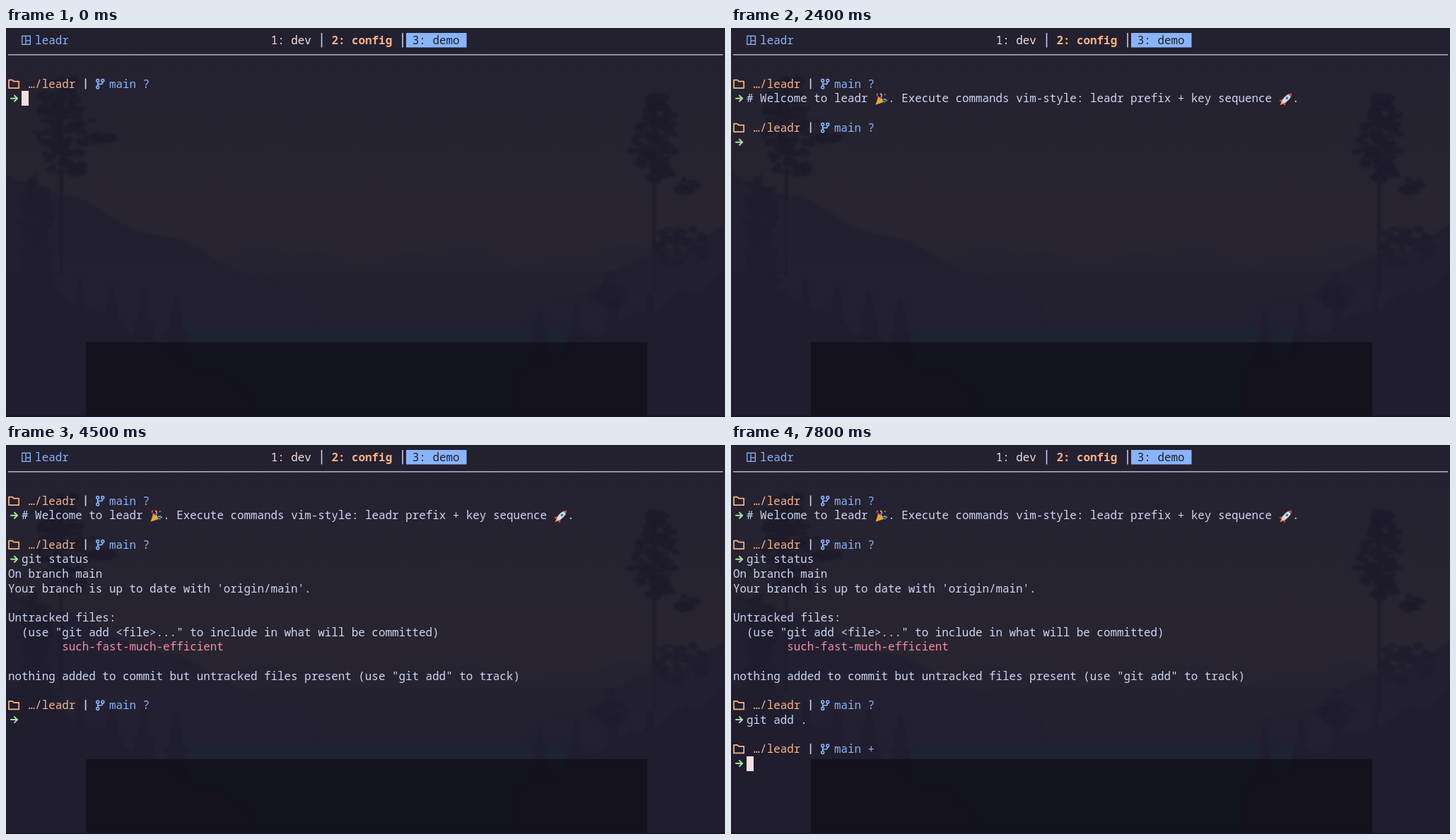
An HTML page with a canvas for the animation above (8000 ms loop, 1017 by 551 pixels).

```html
<!DOCTYPE html>
<html lang="en">
<head>
<meta charset="utf-8">
<title>leadr demo</title>
<style>
  html, body { margin: 0; width: 100%; height: 100%; overflow: hidden; background: #211f2f; }
  canvas { display: block; width: 1017px; height: 551px; }
</style>
</head>
<body>
<canvas id="stage" width="1017" height="551"></canvas>
<script>
const W = 1017, H = 551, LOOP = 8000;
const CELL = 9.53, ROW = 20.67, LEFT = 3, TOP = 6.7;
const MONO = '"Noto Sans Mono", "DejaVu Sans Mono", monospace';
const FONT = '15.88px ' + MONO;
const KEY_FONT = '62.5px ' + MONO;
const C = {
  text: '#cdd6f4', blue: '#89b4fa', peach: '#fab387', green: '#a6e3a1',
  red: '#f38ba8', cursor: '#f5e0dc', dark: '#1e1e2e'
};
const ctx = document.getElementById('stage').getContext('2d');
const colX = c => LEFT + c * CELL;
const rowY = r => TOP + r * ROW;
const midY = r => rowY(r) + ROW / 2;

// ---------- backdrop ----------
function seeded(seed) {
  return () => (seed = (seed * 16807) % 2147483647) / 2147483647;
}

function makeBackdrop() {
  const cv = document.createElement('canvas');
  cv.width = W; cv.height = H;
  const g = cv.getContext('2d'), rnd = seeded(77);

  const fade = (y0, y1, ...colors) => {
    const gr = g.createLinearGradient(0, y0, 0, y1);
    colors.forEach((c, i) => gr.addColorStop(i / (colors.length - 1), c));
    return gr;
  };
  const ridge = (fill, x0, x1, height) => {
    g.fillStyle = fill;
    g.beginPath();
    g.moveTo(x0, H);
    for (let x = x0; x <= x1; x += 4) g.lineTo(x, height(x));
    g.lineTo(x1, H);
    g.fill();
  };
  const leaves = (x, y, rx, ry, n) => {
    for (let i = 0; i < n; i++) {
      const a = rnd() * 6.283, d = Math.sqrt(rnd());
      g.beginPath();
      g.ellipse(x + Math.cos(a) * d * rx, y + Math.sin(a) * d * ry, 3 + rnd() * 5, 2 + rnd() * 3, 0, 0, 7);
      g.fill();
    }
  };
  const pine = (x, top, bottom, half) => {
    for (let y = top; y < bottom; y += 5) {
      const w = half * (y - top + 5) / (bottom - top) * (0.7 + rnd() * 0.5);
      g.fillRect(x - w, y, 2 * w, 5);
    }
  };
  const tallTree = (x, top, crown, bottom, half) => {
    g.fillRect(x - 2, top, 4, bottom - top);
    for (let y = top; y < crown; y += 17) {
      const reach = half * (0.5 + 0.5 * Math.sin((y - top) / (crown - top) * 3));
      leaves(x + (rnd() - 0.4) * 16, y, reach, 10, 22);
    }
  };

  g.fillStyle = fade(0, H, '#232030', '#262331', '#282530', '#252231', '#1f1d2f');
  g.fillRect(0, 0, W, H);

  g.filter = 'blur(1.5px)';
  ridge(fade(300, 420, '#252331', '#232131'), 280, W,
    x => 325 - 12 * Math.sin((x - 330) / 38) - 7 * Math.sin(x / 17));
  ridge(fade(200, 400, '#211f2f', '#232131'), 0, 440,
    x => 205 + 0.41 * x + 6 * Math.sin(x / 23));
  ridge(fade(280, 420, '#211f2f', '#222031'), 740, W,
    x => 285 + 0.42 * (W - x) + 7 * Math.sin(x / 21));
  ridge(fade(418, H, '#1f2231', '#1c2130', '#1c1e2e'), 250, 800, () => 418);

  g.fillStyle = '#1f1d2e';
  leaves(40, 260, 24, 50, 70);
  leaves(955, 310, 38, 30, 60);
  leaves(855, 375, 24, 26, 34);
  pine(42, 205, 360, 28);
  for (let i = 0; i < 5; i++) {
    pine(60 + i * 45, 345 + i * 9, 470, 22);
    pine(755 + i * 52, 400 - i * 9, 490, 20);
  }
  ridge('#1f1d2e', 0, 350, x => 340 + 0.5 * x + 6 * Math.sin(x / 13));
  ridge('#1f1d2e', 720, W, x => 350 + 0.46 * (W - x) + 6 * Math.sin(x / 11));

  g.fillStyle = '#1e1c2c';
  tallTree(78, 80, 205, 350, 38);
  tallTree(917, 105, 210, 375, 34);
  leaves(135, 156, 26, 5, 16);
  leaves(962, 224, 13, 10, 16);
  g.filter = 'none';

  // key panel
  g.fillStyle = 'rgba(0,0,0,.38)';
  g.fillRect(113, 445, 794, 104);
  g.fillStyle = 'rgba(24,8,34,.6)';
  g.fillRect(0, 549, W, 2);
  return cv;
}

// ---------- drawing helpers ----------
function put(str, col, row, color = C.text, weight = 400) {
  ctx.font = weight + ' ' + FONT;
  ctx.fillStyle = color;
  ctx.fillText(str, colX(col), rowY(row) + 15.9);
}

function line(color, width, ...pts) {
  ctx.strokeStyle = color;
  ctx.lineWidth = width;
  ctx.beginPath();
  for (let i = 0; i < pts.length; i += 2) ctx.lineTo(pts[i], pts[i + 1]);
  ctx.stroke();
}

function oval(color, x, y, rx, ry = rx) {
  ctx.fillStyle = color;
  ctx.beginPath();
  ctx.ellipse(x, y, rx, ry, 0, 0, 7);
  ctx.fill();
}

function triangle(color, x1, y1, x2, y2, x3, y3) {
  ctx.fillStyle = color;
  ctx.beginPath();
  ctx.moveTo(x1, y1);
  ctx.lineTo(x2, y2);
  ctx.lineTo(x3, y3);
  ctx.fill();
}

function at(x, y, draw, angle = 0) {
  ctx.save();
  ctx.translate(x, y);
  ctx.rotate(angle);
  ctx.lineJoin = ctx.lineCap = 'round';
  draw();
  ctx.restore();
}

// ---------- icons ----------
function folder(y) {
  at(4, y, () => line(C.peach, 1.7, 0, 6, 0, -5.5, 5, -5.5, 7, -3.5, 14.2, -3.5, 14.2, 6, 0, 6));
}

function branch(y) {
  at(127, y, () => {
    line(C.blue, 1.6, 2.7, -2.5, 2.7, 3);
    line(C.blue, 1.6, 9.8, -2.5, 8.7, 0.3, 4, 0.3, 2.7, 1.5);
    for (const [x, dy] of [[2.7, -4.5], [9.8, -4.5], [2.7, 5]]) {
      ctx.beginPath();
      ctx.arc(x, dy, 1.9, 0, 7);
      ctx.stroke();
    }
  });
}

function arrow(row) {
  at(16, midY(row), () => {
    line(C.green, 2, -9, 0, 0, 0);
    line(C.green, 2, -4, -4, 0, 0, -4, 4);
  });
}

function party(x, y) {
  const rnd = seeded(9), tints = ['#e8504f', '#6cc070', '#5fb0ea', '#f0c850'];
  at(x, y, () => {
    triangle('#e9a335', -8, 8, -4, -4, 4, 4);
    line('#e8504f', 1.6, -1, -2, 1, -5, -1, -8);
    line('#5fb0ea', 1.6, 3, 1, 5, 0, 8, 2);
    for (let i = 0; i < 10; i++) oval(tints[i % 4], rnd() * 14 - 6, rnd() * 12 - 8, 1.1);
  });
}

function rocket(x, y) {
  at(x, y, () => {
    triangle('#f5a33a', -2.5, 6, 2.5, 6, 0, 12);
    triangle('#d8433f', -6, 8, 0, -1, 6, 8);
    oval('#d5dbe2', 0, -1, 3.5, 9);
    triangle('#d8433f', -2.5, -7, 2.5, -7, 0, -12);
    oval('#3f7fb5', 0, -2, 1.9);
  }, Math.PI / 4);
}

// ---------- terminal ----------
function header() {
  ctx.strokeStyle = C.blue;
  ctx.lineWidth = 1.3;
  ctx.strokeRect(22.8, 11.3, 11.6, 12);
  line(C.blue, 1.3, 28, 11.3, 28, 23.3);
  line(C.blue, 1.3, 28, 18, 34.4, 18);
  put('leadr', 4, 0, C.blue);
  put('1: dev', 39, 0, C.cursor);
  put('2: config', 48, 0, C.peach, 600);
  for (const x of [446.5, 561]) line(C.text, 1.5, x, 7, x, 27.5);
  ctx.fillStyle = C.blue;
  ctx.fillRect(566, 7, 85.5, 20.5);
  put('3: demo', 60, 0, C.dark);
  line(C.text, 1.2, 3, 37.8, 1014, 37.8);
}

function prompt(row, mark, ready) {
  const y = midY(row);
  folder(y);
  put('…/leadr', 3, row, C.peach);
  line(C.text, 1.6, 112.6, y - 7.5, 112.6, y + 7.5);
  branch(y);
  put('main ' + mark, 15, row, C.blue);
  if (ready) arrow(row + 1);
}

function welcome() {
  put('# Welcome to leadr ', 2, 4);
  party(212.5, midY(4) + 1);
  put('. Execute commands vim-style: leadr prefix + key sequence ', 23, 4);
  rocket(785, midY(4) + 1);
  put('.', 83, 4);
}

function gitStatus() {
  put('git status', 2, 7);
}

function statusReport() {
  put('On branch main', 0, 8);
  put("Your branch is up to date with 'origin/main'.", 0, 9);
  put('Untracked files:', 0, 11);
  put('(use "git add <file>..." to include in what will be committed)', 2, 12);
  put('such-fast-much-efficient', 8, 13, C.red);
  put('nothing added to commit but untracked files present (use "git add" to track)', 0, 15);
}

function gitAdd() {
  put('git add .', 2, 18);
}

function cursor(col, row) {
  ctx.fillStyle = C.cursor;
  ctx.fillRect(Math.round(colX(col)), Math.round(rowY(row)), 10, 21);
}

// Keys are right-aligned; each box hugs the ink of its label.
function keys(labels) {
  const pad = 8.5, gap = 30;
  ctx.font = KEY_FONT;
  ctx.fillStyle = ctx.strokeStyle = '#fff';
  ctx.lineWidth = 1.7;
  let right = 877;
  for (const label of labels.reverse()) {
    const m = ctx.measureText(label);
    const w = Math.round(m.actualBoundingBoxLeft + m.actualBoundingBoxRight + 2 * pad);
    const x = right - w;
    ctx.strokeRect(x + 0.9, 461.9, w - 1.8, 79.4);
    ctx.fillText(label, x + pad + m.actualBoundingBoxLeft, 533 - m.actualBoundingBoxDescent);
    right = x - gap;
  }
}

// ---------- timeline ----------
// Each command: key presses, then it runs on its row, then a new prompt is ready.
const COMMANDS = [
  { press: { 'Ctrl+g': 300, d: 600, 1: 700 }, run: 800, done: 900, clear: 1600, row: 4, mark: '?', type: welcome },
  { press: { 'Ctrl+g': 3300, g: 3500, s: 3700 }, run: 3700, done: 3800, clear: 4500, row: 7, mark: '?', type: gitStatus, print: statusReport },
  { press: { 'Ctrl+g': 6200, g: 6600, a: 6700 }, run: 6700, done: 6800, clear: 7500, row: 18, mark: '?', type: gitAdd },
  { press: { 'Ctrl+g': Infinity }, run: Infinity, done: Infinity, row: 21, mark: '+' }
];
const BLINK = 500;
const backdrop = makeBackdrop();

function draw(t) {
  ctx.drawImage(backdrop, 0, 0);
  header();

  let ready = 0;
  for (const { press, run, done, clear, row, mark, type, print } of COMMANDS) {
    if (t < ready) break;
    const lead = press['Ctrl+g'];
    prompt(row - 1, mark, t < lead || t >= run);
    if (t >= run) type();
    if (t >= done && print) print();

    if (t < lead) {
      if (Math.floor((t - ready) / BLINK) % 2 === 0) cursor(2, row);
    } else if (t < done) {
      cursor(0, t < run ? row : row + 1);
    }
    if (t < clear) {
      const order = Object.keys(press).sort((a, b) => press[a] - press[b]);
      keys(order.filter(k => press[k] <= t));
    }
    ready = done;
  }
}

const start = performance.now();
function tick() {
  draw((performance.now() - start) % LOOP);
  requestAnimationFrame(tick);
}
tick();
</script>
</body>
</html>
```
